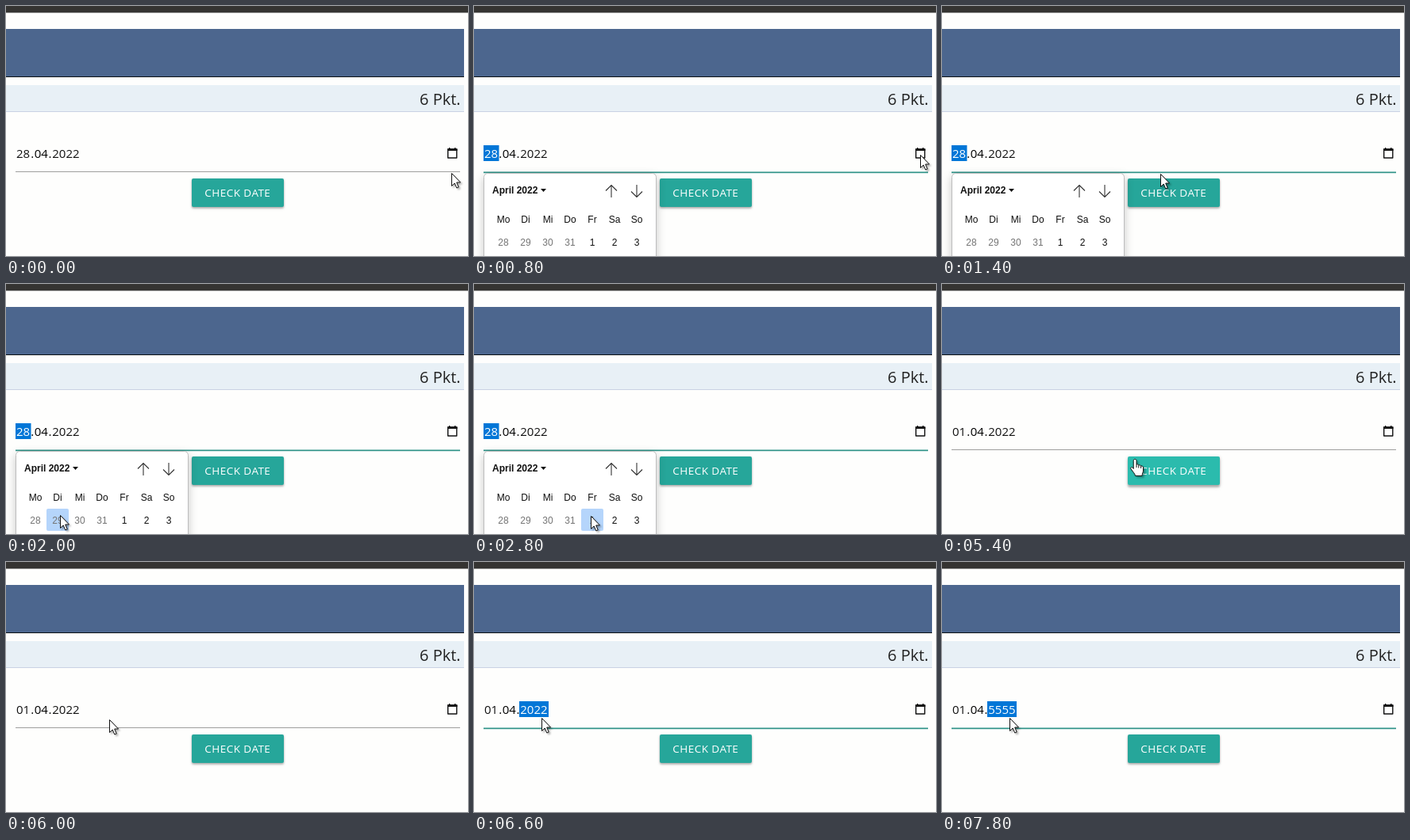
An HTML page that plays this animation: 582x316 px, repeating every 8000 ms.

```html
<!DOCTYPE html>
<html lang="de">
<meta charset="utf-8">
<title>Date check</title>
<style>
  html, body { margin: 0; width: 100%; height: 100%; overflow: hidden; background: #fefefd; }
  svg { display: block; font-family: "Open Sans", "Noto Sans", sans-serif; }
  #btn { filter: drop-shadow(0 2px 1px rgba(0,0,0,.18)) drop-shadow(0 1px 1.5px rgba(0,0,0,.2)); }
  #btn.over { filter: drop-shadow(0 3px 1px rgba(0,0,0,.22)) drop-shadow(0 1px 2px rgba(0,0,0,.2)); }
  #popup { font: 12px "Liberation Sans", Arial, sans-serif; }
  #panel { filter: drop-shadow(0 4px 6px rgba(0,0,0,.22)); }
  #pointer { filter: drop-shadow(2px 2px 1px rgba(0,0,0,.3)); }
</style>
<svg width="582" height="316" viewBox="0 0 582 316">
  <rect width="582" height="316" fill="#fefefd"/>
  <rect width="582" height="8.5" fill="#353432"/>
  <rect y="29" width="577" height="60" fill="#4c668e"/>
  <rect y="89" width="577" height="1" fill="#0c1014"/>
  <rect y="100" width="577" height="33" fill="#e8f0f6"/>
  <rect y="133" width="577" height="1" fill="#c9d2e4"/>
  <text x="521" y="125" font-size="20" fill="#222">6 Pkt.</text>

  <rect id="mark" y="176" height="20" fill="#0076d7"/>
  <g id="date" font-size="15">
    <text x="13" y="192"></text><text x="31.3" y="192">.</text>
    <text x="35.8" y="192">04</text><text x="53.4" y="192">.</text>
    <text x="58.3" y="192"></text>
  </g>
  <path d="M556.7 181H567.8V192H556.7Z" fill="none" stroke="#111" stroke-width="1.4" stroke-linejoin="round"/>
  <path d="M556 180.5H568.5V183H556ZM558 179H559.4V181H558ZM565 179H566.4V181H565Z" fill="#111"/>
  <rect id="line" x="12" width="560"/>

  <g id="btn">
    <rect x="234" y="218" width="116" height="36" rx="2"/>
  </g>
  <text x="250.3" y="241" font-size="13.5" letter-spacing=".46" fill="#fff">CHECK DATE</text>

  <g id="popup">
    <rect id="panel" x="12.5" y="211.5" width="217" height="130" rx="5" fill="#fff" stroke="#bdbdbd"/>
    <text x="23" y="237" font-weight="bold" fill="#101010">April 2022</text>
    <path d="M84 231H91L87.5 235Z" fill="#101010"/>
    <path d="M173 242V226.5M166 233.5L173 226.5L180 233.5M205 226V241.5M198 234.5L205 241.5L212 234.5" fill="none" stroke="#333" stroke-width="1.1"/>
    <rect id="cell" y="284" width="28" height="28" rx="2" fill="#b5d5fb"/>
    <g id="days" text-anchor="middle"></g>
  </g>

  <g id="pointer" fill="#fff" stroke="#111" stroke-linejoin="round">
    <path id="arrow" d="M.5 .5V16.5L4.2 13L6.8 19L9.2 18L6.7 12H11.5Z"/>
    <path id="hand" transform="translate(-6)" d="M6 .5C7.3 .5 8 1.3 8 2.5V7C9 6.6 10.5 7 10.8 8C12 7.6 13.3 8 13.6 9C15 8.7 16.5 9.5 16.5 11V15C16.5 17 15 18.5 15 21.5H6.5C6.5 19 3 16 .9 12.5C.2 11 2 10 3.2 11L4.2 12.5V2.5C4.2 1.3 4.8 .5 6 .5ZM8 7V11M10.8 8V11.5M13.6 9V12"/>
  </g>
</svg>
<script>
const LOOP = 8000, STEP = 200;
const el = id => document.getElementById(id);
const show = (id, on) => el(id).setAttribute("visibility", on ? "inherit" : "hidden");
const set = (id, attrs) => { for (const k in attrs) el(id).setAttribute(k, attrs[k]); };

// Pointer path: time, x, y
const path = [
  [0, 561, 211], [400, 562, 186], [800, 562, 188], [1400, 275, 212],
  [1800, 110, 286], [2000, 68, 292], [2200, 76, 295], [2600, 138, 295],
  [2800, 147, 293], [3600, 147, 293], [4200, 176, 215], [4400, 205, 218],
  [4800, 252, 228], [5200, 246, 224], [5400, 243, 221], [6200, 92, 192],
  [6400, 85, 197], [8000, 85, 197]
];

function pointerAt(t) {
  const i = path.findIndex(p => p[0] > t);
  const [t0, x0, y0] = path[i - 1], [t1, x1, y1] = path[i];
  const k = (t - t0) / (t1 - t0);
  return [Math.round(x0 + (x1 - x0) * k), Math.round(y0 + (y1 - y0) * k)];
}

function addDay(label, col, y, fill) {
  const text = document.createElementNS("http://www.w3.org/2000/svg", "text");
  text.textContent = label;
  text.setAttribute("x", 37 + 28 * col);
  text.setAttribute("y", y);
  text.setAttribute("fill", fill);
  el("days").append(text);
}
["Mo", "Di", "Mi", "Do", "Fr", "Sa", "So"].forEach((d, i) => addDay(d, i, 274, "#101010"));
[28, 29, 30, 31, 1, 2, 3].forEach((d, i) => addDay(d, i, 303, d > 9 ? "#757575" : "#101010"));

const parts = el("date").children;

function draw(t) {
  const [x, y] = pointerAt(t);
  const open = t >= 600 && t < 3200;
  const dayFocus = t >= 600 && t < 4800;
  const yearFocus = t >= 6400;
  const focus = dayFocus || yearFocus;
  const over = x >= 234 && x < 350 && y >= 218 && y < 254;

  // Each keystroke shifts another 5 into the zero-padded year
  const typed = Math.max(0, Math.min(4, Math.floor((t - 7000) / STEP)));
  parts[0].textContent = t < 3200 ? "28" : "01";
  parts[4].textContent = typed ? "5".repeat(typed).padStart(4, "0") : "2022";
  parts[0].setAttribute("fill", dayFocus ? "#fff" : "#111");
  parts[4].setAttribute("fill", yearFocus ? "#fff" : "#111");

  show("mark", focus);
  set("mark", yearFocus ? { x: 57, width: 37 } : { x: 12, width: 19.5 });
  set("line", focus ? { y: 209.5, height: 1.7, fill: "#2f9388" } : { y: 209, height: 1, fill: "#9e9e9e" });
  set("btn", { class: over ? "over" : "", fill: over ? "#2bbbad" : "#26a69a" });

  show("popup", open);
  const col = Math.floor((x - 23) / 28);
  show("cell", open && y >= 284 && col >= 0 && col < 7);
  set("cell", { x: 23 + 28 * col });

  show("arrow", !over);
  show("hand", over);
  set("pointer", { transform: `translate(${x} ${y})` });
}

const start = performance.now();
function tick() {
  const t = (performance.now() - start) % LOOP;
  draw(Math.floor(t / STEP) * STEP);
  requestAnimationFrame(tick);
}
tick();
</script>
</html>
```
